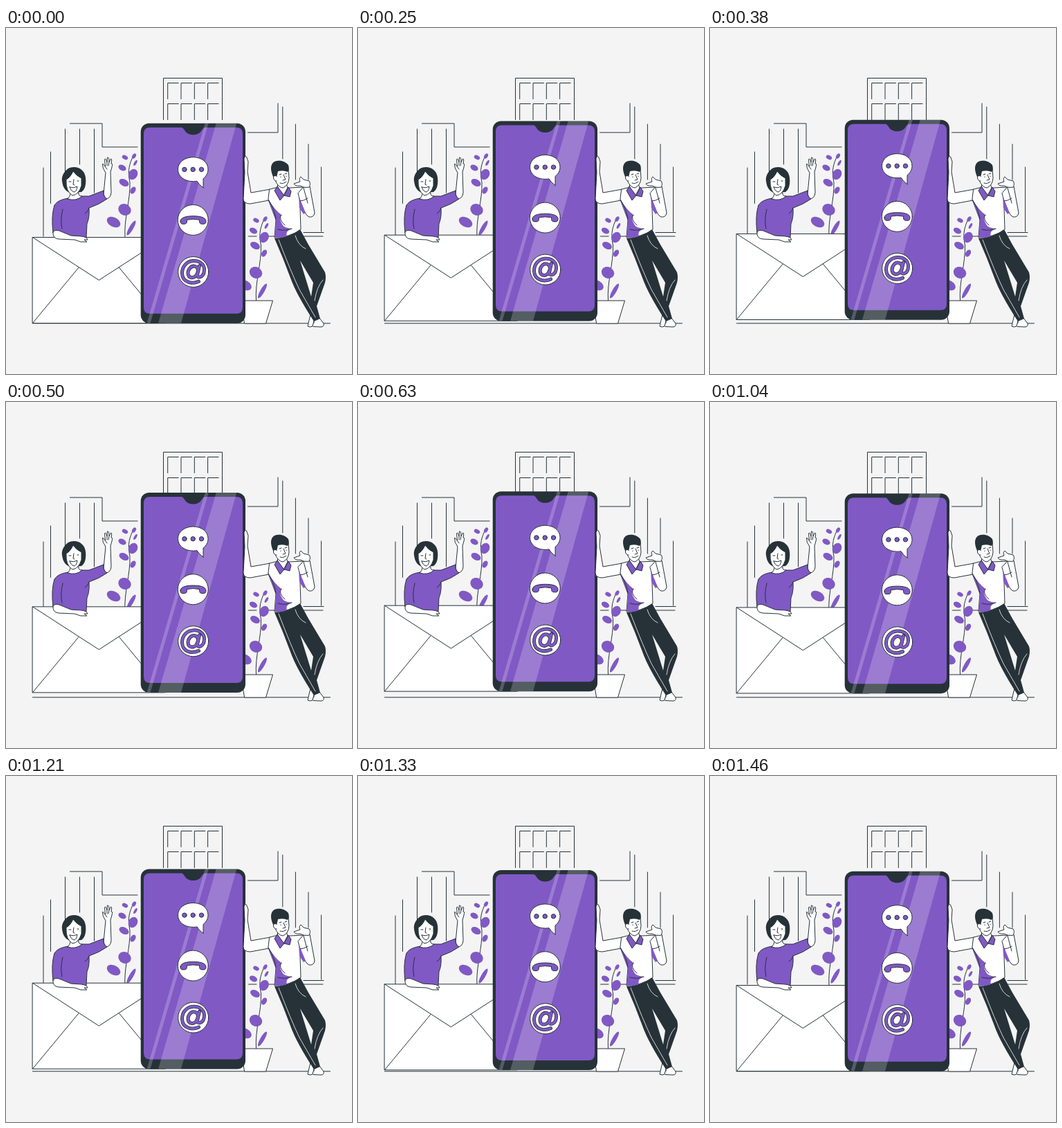
Animation, 500 px wide and 500 px high, one loop 1.5 s. Source, as an HTML page:

```html
<!DOCTYPE html>
<html>
<head>
<meta charset="utf-8">
<style>
html, body { margin: 0; width: 100%; height: 100%; overflow: hidden; background: #f4f4f4; }
svg { display: block; width: 100%; height: 100%; }
.ink { fill: none; stroke: #263238; stroke-linecap: round; stroke-linejoin: round; }
.white { fill: #fff; }
.purple { fill: #8059c5; }
.dark { fill: #263238; stroke: none; }
.flat { stroke: none; }
.shine { fill: #fff; opacity: .21; stroke: none; }
.seam { stroke: #fff; stroke-width: .8; }
</style>
</head>
<body>
<svg viewBox="0 0 500 500" class="ink">
  <defs>
    <g id="plant">
      <path d="M172 303C170 277 180 248 179 223C175 204 179 196 184 184"/>
      <g id="leaves" class="purple flat"></g>
    </g>
    <clipPath id="body"><rect x="194.7" y="138" width="151.3" height="289" rx="12"/></clipPath>
  </defs>

  <g id="city">
    <path d="M227.5 132.5V72.5H312.5V132.5"/>
    <path id="lines"/>
    <path d="M92.5 138H139V172H190M54 202V301M393 109V151H349.500"/>
    <path d="M430 295.500H459M350.500 301H362M379 301H388M427 301H458M38.500 426.800H468.500"/>
  </g>

  <use href="#plant"/>
  <use href="#plant" x="189.500" y="91"/>
  <path class="white" d="M339.500 394H385.500L375.500 427H345Z"/>

  <g id="float">
    <rect class="white" x="38.500" y="302.800" width="191.500" height="124"/>
    <path d="M38.500 302.800L134.300 364.700L230 302.800M38.500 426.700L105 346.500M230 426.700L163.500 346.500"/>
    <rect class="dark" x="194.700" y="138" width="151.300" height="289" rx="12"/>
    <path class="purple flat" d="M208 144H253C259 144 257 154.500 270.500 154.500S282 144 288 144H333Q342 144 342 153V404Q342 413 333 413H208Q199 413 199 404V153Q199 144 208 144Z"/>
    <g clip-path="url(#body)" class="shine">
      <path d="M288 137H293L208.500 427H203.500Z"/>
      <path d="M304 137H333.500L253 427H220Z"/>
    </g>
    <path class="white" d="M285 231V218C289 215 292 210 292 204.500C292 194 282.500 187 270.500 187S248.500 194 248.500 204.500S258 222 270.500 222Q274 222 276 221.500Q279 227 285 231Z"/>
    <g id="dots" class="purple"></g>
    <circle class="white" cx="270.300" cy="277.700" r="22"/>
    <path class="purple" d="M252 279.500C252 273.500 262 272 270.500 272S289 273.500 289 279.500C289 283.500 287 283.500 284 283.500C280 283.500 279.500 282 279.500 277.500Q270.500 275.500 261.500 277.500C261.500 282 261 283.500 257 283.500C254 283.500 252 283.500 252 279.500Z"/>
    <circle class="white" cx="270.700" cy="352.700" r="22"/>
    <g id="at">
      <path stroke-width="5" d="M279.500 344L276.500 357C276 363 286.500 361 286.500 349.500C286.500 331.500 254 332 254.500 355C255 369 270 370.500 278.500 366.500M277.500 351C277.500 344 270 342.500 266 347C261.500 352 262 360 268 361C273 361.500 276.500 357 277.500 351"/>
    </g>
  </g>

  <g id="woman">
    <path class="white" d="M141 240L144 209Q139 203 139.500 196L143.500 200L142.500 190Q144 187 146 194L146.500 187Q149 186 149 194L151.500 189Q153.500 189 152 196Q154.500 195 153 201L151 208L152 238Q151 247 144 247Z"/>
    <path d="M146 194V199M149 194L148 199M143 200L146 204"/>
    <path class="purple" d="M90 246Q99 251 109 243L120 243L141 235Q140 243 146 247Q135 255 120 260Q121 274 117 283L116 303Q98 305 80 301L68 296Q65 272 70 256Q75 248 90 246Z"/>
    <path d="M82 262Q78 278 81 290M120 260Q118 266 114 268"/>
    <path class="dark" d="M98 201C87 201 80 212 81 221C82 231 87 238 95 238L109 237C115 233 116 224 115 216C114 207 107 201 98 201Z"/>
    <path class="white" d="M89 247Q93 244 93 238H105Q104 243 110 243Q101 251 89 247Z"/>
    <path class="white" d="M97 207Q93 216 87 219Q86 236 96 242Q105 241 109 228V217Q102 214 97 207Z"/>
    <path class="white" d="M92 230Q98 232 103 229Q102 237 98 237Q94 236 92 230Z"/>
    <path d="M98 219L97 226L99 227M91 222H94M103 221H105"/>
    <path class="white" d="M68 295Q70 291 77 293L94 300L109 301Q117 302 118 306L113 306L117 309L108 309L99 306L76 305Q67 304 68 295Z"/>
  </g>

  <g id="man">
    <path class="white" d="M345 208L344 189Q345 184 347.500 186L350 193L349 208L354 238L382 233L380 249L353 254Q343 254 343 247Z"/>
    <path class="white" d="M440 414L436 431Q439 433 443 431L446 420Z"/>
    <path class="white" d="M445 421L453 419L459 427Q460 432 455 432L444 431.500Q442 430 445 426Z"/>
    <path class="dark" fill-rule="evenodd" d="M388 304Q410 303 425 291L437 313L461 353Q463 360 461 368L449 402L454 420L445 424Q419 384 411 361Q400 331 388 304ZM425 336L444 368L441 388Z"/>
    <path class="seam" d="M394 306Q412 353 424 378L447 418M418 300Q422 314 433 319M458 364Q449 374 446 394"/>
    <path class="white" d="M381 233L393 230L410 231L430 230L436 247L425 261L426 291Q409 303 388 303L390 277L379 248Z"/>
    <path class="purple flat" d="M378.500 246Q388 263 398 270Q393 275 400 285Q402 289 414 290Q403 293 406 301Q396 304 388 303L390 277Z"/>
    <path d="M398 270Q393 276 403 285M393 291Q404 294 413 290M379 248Q389 263 390 277"/>
    <path class="white" d="M430 230L439 229L446 267Q445 274 438 273Q432 271 425 250L422 239Z"/>
    <path class="purple flat" d="M423 243L433 267L430 269L424 260Z"/>
    <path d="M425 250Q430 250 436 246M430 231L436 253"/>
    <path class="white" d="M430 230L425 228Q418 229 416 225L425 222Q423 217 426 215L430 219L438 221Q441 225 438 230Z"/>
    <path class="white" d="M393 222L392 232L401 242L407 231L405 225Z"/>
    <path class="purple" d="M392 229L388 235L396 249L402 242L410 244L412 236L408 230L402 242Z"/>
    <path class="white" d="M387 207L389 220Q393 230 400 231Q408 228 409 217L408 203Z"/>
    <path class="dark" d="M387 217C382 207 381 197 388 193C396 190 404 193 408 198Q410 204 407 208Q401 205 393 207L391 216Z"/>
    <path class="white" d="M391 214Q386 212 386.500 217Q388 222 391 221"/>
    <path d="M401 212L404 219L400 220M395 212L398 211M403 211L406 210M396 224Q401 226 405 222M397 215V215.500M405 214V214.500"/>
  </g>
</svg>
<script>
const $ = id => document.getElementById(id);

// Leaves lean away from the stem: centre and length
const leaf = (x, y, r, ratio = .65) =>
  `<ellipse cx="${x}" cy="${y}" rx="${r}" ry="${r * ratio}" transform="rotate(${x < 178 ? 28 : -60} ${x} ${y})"/>`;
$('leaves').innerHTML =
  leaf(185, 185, 4) + leaf(172, 187, 4.5) + leaf(187, 195, 4.5, .4) + leaf(168, 202, 6) +
  leaf(183.5, 211.5, 8, .8) + leaf(170.5, 223.5, 7.5) + leaf(183.5, 234.5, 5.5) +
  leaf(171.5, 262.5, 9.5, .85) + leaf(155.5, 280.5, 10.5) + leaf(181, 289, 12, .25);

const line = (x, top, bottom) => `M${x} ${top}V${bottom}`;
let d = line(64.5, 179, 253.5);
for (let i = 0; i < 3; i++) d += line(85.5 + 21 * i, 146, [226, 197, 238][i]);
for (let i = 0; i < 4; i++) {
  d += line(399.8 + 18.6 * i, 114 + 23 * i + i * i * 2, [189, 219, 219, 294][i]);
  for (const y of [79.5, 109.5]) d += `M${233.7 + i * 19.3} ${y + 23}v-23h15.5`;
}
$('lines').setAttribute('d', d);

$('dots').innerHTML = [-1, 0, 1].map(i =>
  `<circle cx="${270.2 + i * 12.3}" cy="204.7" r="3.2"/>`).join('');

// The @ is a dark stroke with a thinner purple one on top
const at = $('at').firstElementChild.cloneNode();
at.setAttribute('stroke-width', 3.4);
at.setAttribute('stroke', '#8059c5');
$('at').append(at);

const half = 750, lift = 10, lead = 20;
function draw(now) {
  const phase = ((now + lead) / half) % 2;
  const y = -lift * (1 - Math.abs(phase - 1));
  $('float').setAttribute('transform', `translate(0 ${y})`);
}
let start;
function tick(now) {
  start ??= now;
  draw(now - start);
  requestAnimationFrame(tick);
}
draw(0);
requestAnimationFrame(tick);
</script>
</body>
</html>
```
